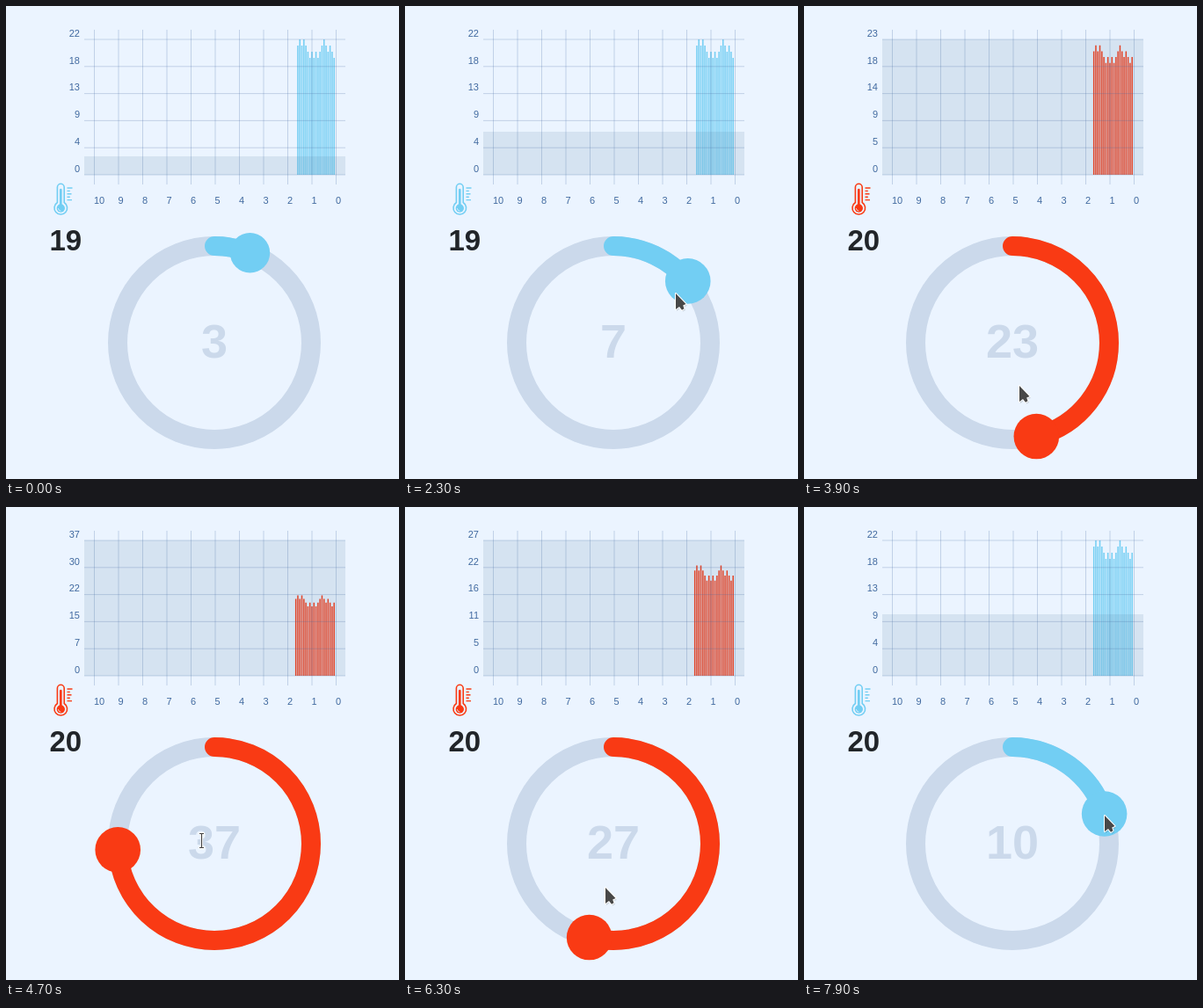
An HTML page for the animation above (8 s loop, 447x538 px).

```html
<!DOCTYPE html>
<html lang="en">
<head>
<meta charset="utf-8">
<title>Thermostat dial</title>
<style>
  html, body { margin: 0; width: 100%; height: 100%; overflow: hidden; background: #ebf4ff; }
  svg { display: block; width: 447px; height: 538px; color: #72cef3; }
  svg.heating { color: #f93a14; }
  text { font-family: "Liberation Sans", Arial, sans-serif; }
  .label { font-size: 11px; fill: #40699f; }
  .grid { stroke: #4668a0; stroke-opacity: .25; }
  .shade { fill: #50779c; fill-opacity: .142; }
  .line { fill: none; stroke: currentColor; }
  .ring { fill: none; stroke: #cbd9eb; stroke-width: 22; }
  .big { font-weight: bold; }
</style>
</head>
<body>
<svg id="stage" viewBox="0 0 447 538">
  <path id="bars" class="line" stroke-width="1.5"/>
  <rect id="shade" class="shade" x="89" width="297"/>
  <path id="grid" class="grid"/>
  <g id="labels"></g>

  <g class="line" stroke-width="1.6" stroke-linecap="round">
    <path d="M58.4 223.5V206.2a3.9 3.9 0 0 1 7.8 0V223.5A7.3 7.3 0 1 1 58.4 223.5Z"/>
    <path d="M62.3 209V228" stroke-width="2.7"/>
    <circle cx="62.3" cy="230" r="4.7" fill="currentColor" stroke="none"/>
    <path d="M59.4 230.5a3 3 0 0 0 2.6 2.6" stroke="#ebf4ff" stroke-width=".8"/>
    <path d="M69.5 207H75.5M69.5 210.4H72.8M69.5 213.8H74.5M69.5 217.2H72.8M69.5 220.6H75" stroke-width="1.4" stroke-linecap="butt"/>
  </g>
  <text id="temperature" class="big" x="49.5" y="278" font-size="33" fill="#212529"></text>

  <circle class="ring" cx="237" cy="383" r="110"/>
  <circle id="arc" class="line" cx="237" cy="383" r="110" stroke-width="22" stroke-linecap="round"
          pathLength="50" transform="rotate(-90 237 383)"/>
  <text id="target" class="big" x="237" y="399.5" font-size="54" text-anchor="middle" fill="#cbd9eb"></text>
  <circle id="handle" fill="currentColor"/>

  <g id="cursor">
    <g id="arrow" stroke-linejoin="round">
      <path d="M1 2V20L5 17 8 20.5 11 19 9.5 15 13 14Z" fill="#000" fill-opacity=".14"/>
      <path d="M0 0V18L4 15 7 18.8 9.5 17.2 8.2 13.5 11.5 12Z" fill="#484848" stroke="#fff" stroke-width="2" paint-order="stroke"/>
    </g>
    <g id="beam" fill="none" transform="translate(.5 0)">
      <path d="M-3 -8.5H3M0 -8.5V7.5M-3 7.5H3" stroke="#fff" stroke-width="3"/>
      <path d="M-2.5 -8.5H2.5M0 -8.5V7.5M-2.5 7.5H2.5" stroke="#444" stroke-width="1.2"/>
    </g>
  </g>
</svg>
<script>
const LOOP = 8000, STEP = 100;
const BASE = 192, HEIGHT = 154, COLUMN = 27.5;
const CX = 237, CY = 383, RADIUS = 110, UNITS = 50;
const GRAB = 1700, LAG = 30;

// Pointer path: time, x, y
const path = [
  [400, 267, 518], [1000, 280, 281], [GRAB, 280, 281], [2400, 313, 335], [2600, 313, 335],
  [3000, 296, 404], [3900, 245, 432], [4400, 225, 414], [4700, 222, 380], [5400, 222, 370],
  [6300, 228, 433], [7200, 311, 407], [7900, 342, 351]
];

const $ = id => document.getElementById(id);

function pointerAt(t) {
  const next = Math.max(1, path.findIndex(key => key[0] >= t));
  const [t0, x0, y0] = path[next - 1], [t1, x1, y1] = path[next];
  const p = Math.max(0, (t - t0) / (t1 - t0));
  return [x0 + (x1 - x0) * p, y0 + (y1 - y0) * p];
}

// The dial snaps to the pointer's direction, slightly late.
function dialAt(t) {
  const [x, y] = pointerAt(Math.max(GRAB, t - LAG));
  const turn = Math.atan2(x - CX, CY - y) / (2 * Math.PI);
  return Math.round((turn + 1) % 1 * UNITS);
}

// A slow wave, stepping between odd and even degrees.
function reading(i) {
  const wave = 20.19 + Math.cos(2 * Math.PI * (i - 2) / 11.3);
  const odd = (i + 1) % 2;
  return 2 * Math.round((wave - odd) / 2) + odd;
}

function addLabel(x, y, anchor, content = "") {
  const label = document.createElementNS("http://www.w3.org/2000/svg", "text");
  label.setAttribute("class", "label");
  label.setAttribute("x", x);
  label.setAttribute("y", y);
  label.setAttribute("text-anchor", anchor);
  label.textContent = content;
  $("labels").append(label);
  return label;
}

function set(id, attributes) {
  for (const name in attributes) $(id).setAttribute(name, attributes[name]);
}

let gridPath = "";
for (let i = 0; i <= 10; i++) {
  gridPath += `M${100.5 + i * COLUMN} 27V203`;
  addLabel(100 + i * COLUMN, 225, "start", 10 - i);
}
const scale = [];
for (let i = 0; i <= 5; i++) {
  const y = BASE - i * HEIGHT / 5;
  gridPath += `M89 ${y}H386`;
  scale.push(addLabel(84, Math.round(y - 3.3), "end"));
}
set("grid", { d: gridPath });

function draw(t) {
  const target = dialAt(t);
  const count = t < 2800 ? 19 : 20;
  const temperature = reading(count - 1);
  const top = Math.max(22, target);
  const toY = value => BASE - HEIGHT * value / top;

  $("stage").classList.toggle("heating", target > temperature);
  $("temperature").textContent = temperature;
  $("target").textContent = target;
  scale.forEach((label, i) => label.textContent = Math.round(top * i / 5));

  let bars = "";
  for (let i = 0; i < count; i++) {
    const x = 373.2 - (count - 1 - i) * COLUMN / 12;
    bars += `M${x} ${BASE}V${toY(reading(i))}`;
  }
  set("bars", { d: bars });
  set("shade", { y: toY(target), height: BASE - toY(target) });

  const angle = target / UNITS * 2 * Math.PI;
  set("arc", { "stroke-dasharray": `${target} ${UNITS}` });
  set("handle", {
    cx: CX + RADIUS * Math.sin(angle),
    cy: CY - RADIUS * Math.cos(angle),
    r: t <= GRAB ? 22.7 : 25.8
  });

  const [x, y] = pointerAt(t);
  const overText = Math.abs(x - CX) < 32 && Math.abs(y - CY) < 30;
  set("cursor", {
    transform: `translate(${Math.round(x)} ${Math.round(y)})`,
    visibility: t < path[0][0] ? "hidden" : "visible"
  });
  set("arrow", { display: overText ? "none" : "inline" });
  set("beam", { display: overText ? "inline" : "none" });
}

const start = performance.now();
function tick() {
  const t = (performance.now() - start) % LOOP;
  draw(Math.floor(t / STEP) * STEP);
  requestAnimationFrame(tick);
}
tick();
</script>
</body>
</html>
```
